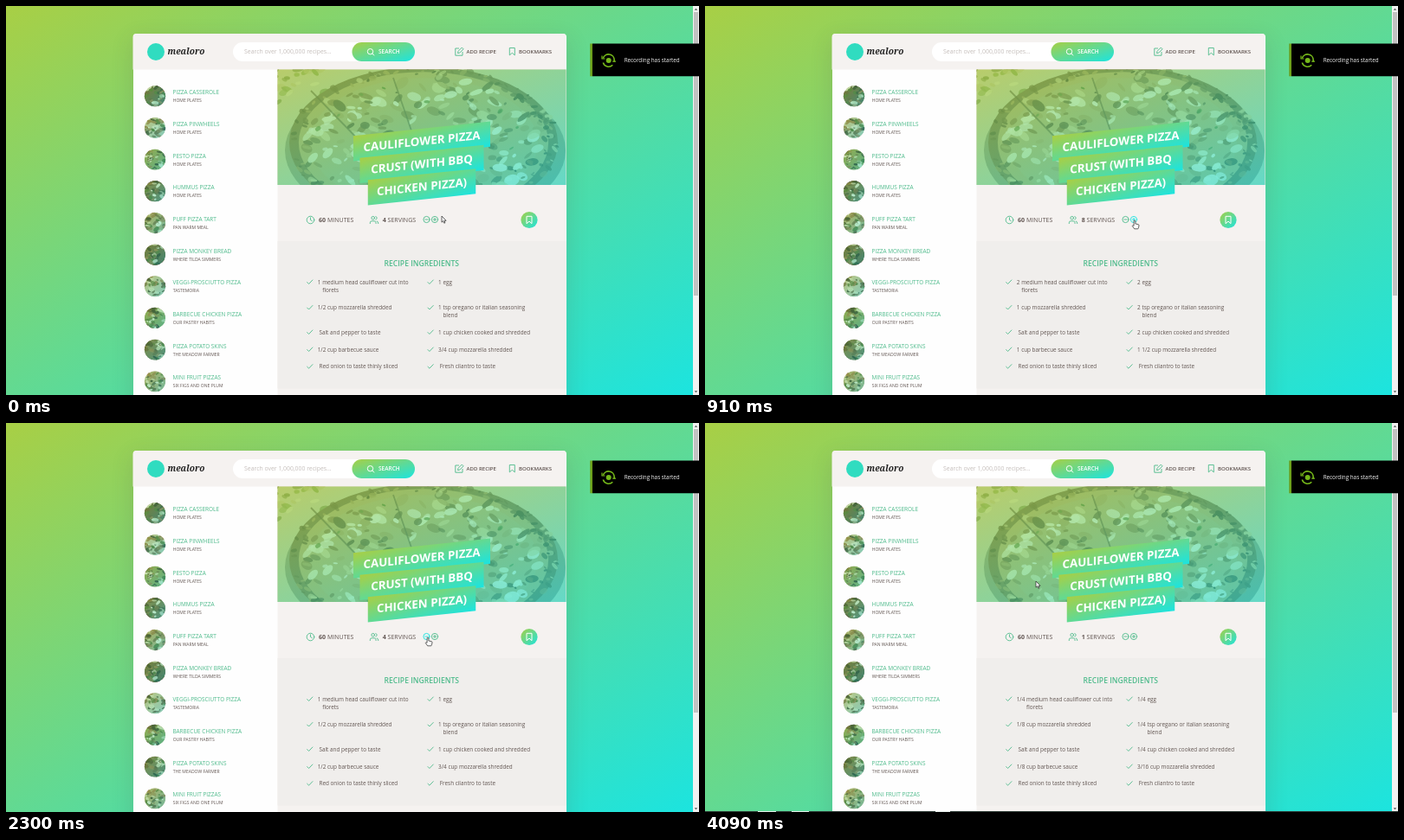
These frames come from a looping animation (800x450 px, 4.12 s). An HTML page:

```html
<!DOCTYPE html>
<html lang="en">
<head>
<meta charset="utf-8">
<title>Recipe servings</title>
<style>
  html, body { margin: 0; width: 100%; height: 100%; overflow: hidden; }
  body { position: relative; font-family: "Open Sans", "Noto Sans", sans-serif; color: #615551; }
  body > * { position: absolute; }
  #back { left: 0; top: 0; width: 793px; height: 455px; background: linear-gradient(to right bottom, #a8cf45, #1be4e0); }
  #card {
    left: 146.5px; top: 32px; width: 500px; height: 487px; border-radius: 4px; background: #fefefe;
    box-shadow: 0 8px 25px 2px rgba(78, 68, 61, .15);
  }
  svg { left: 0; top: 0; }
  .row { position: absolute; display: flex; white-space: nowrap; font-size: 6.37px; line-height: 9px; }
  .row b { font-weight: 400; margin-right: 1.8px; }
</style>
</head>
<body>
<div id="back"></div>
<div id="card"></div>
<svg width="800" height="450" viewBox="0 0 800 450" fill="#615551">
  <defs>
    <linearGradient id="mix" x1="0" y1="0" x2="1" y2="1">
      <stop stop-color="#a8cf45"/><stop offset="1" stop-color="#1be4e0"/>
    </linearGradient>
    <clipPath id="photoClip"><path d="M313.500 73.500H646.500V207H313.500Z"/></clipPath>
    <clipPath id="thumbClip"><circle r="12.200"/></clipPath>
    <path id="mark" d="M-3 -4.200h6v8.400l-3 -2.600l-3 2.600z" fill="none" stroke-linejoin="round"/>
    <g id="lens" fill="none" stroke="#fff"><circle r="3.200"/><path d="M2.300 2.300L4.600 4.600"/></g>
  </defs>

  <path d="M146.500 73.500V36a4 4 0 0 1 4 -4H642.500a4 4 0 0 1 4 4V450H313.500V73.500Z" fill="#f5f2f0"/>
  <path d="M313.500 272H646.500V442.500H313.500Z" fill="#f0eeec"/>

  <!-- header -->
  <circle cx="173" cy="53" r="10" fill="#30dcc0"/>
  <text x="186.500" y="56" font-size="10" font-weight="700" font-style="italic" font-family="'Noto Serif', serif" fill="#222">mealoro</text>
  <rect x="262" y="42" width="210" height="22" rx="11" fill="#fff"/>
  <text x="275" y="55.300" font-size="6.900" fill="#c5bebb">Search over 1,000,000 recipes...</text>
  <rect x="399.500" y="42" width="72.500" height="22" rx="11" fill="url(#mix)"/>
  <use href="#lens" x="420.500" y="52.700"/>
  <g font-weight="600">
    <text x="430" y="55.300" font-size="6.500" fill="#fff">SEARCH</text>
    <text x="531.500" y="55" font-size="6.050">ADD RECIPE</text>
    <text x="592" y="55" font-size="6.050">BOOKMARKS</text>
  </g>
  <g fill="none" stroke="#4fbb8c" stroke-width=".9" stroke-linejoin="round">
    <path d="M523 49H518.800V57.200H527V53M521.500 54.600L522 52.300L526.300 48L528.100 49.800L523.800 54.100Z"/>
    <use href="#mark" x="584.300" y="52.700"/>
  </g>

  <g id="list"></g>
  <g id="photo" clip-path="url(#photoClip)"></g>
  <g id="title" transform="translate(0 50.450) skewY(-6)" text-anchor="middle" font-size="13.350" font-weight="700"></g>

  <!-- details -->
  <g fill="none" stroke="#4fbb8c" stroke-width=".9" stroke-linecap="round">
    <circle cx="351.500" cy="247.500" r="4.300"/>
    <path d="M351.500 244.800V247.500L353.300 248.600"/>
    <circle cx="423.700" cy="245.200" r="1.800"/>
    <path d="M420.300 251.600V250.800a2 2 0 0 1 2 -2h2.800a2 2 0 0 1 2 2V251.600M426.800 243.500a1.800 1.800 0 0 1 0 3.500M428.200 249a2 2 0 0 1 1.500 1.900V251.600"/>
    <g id="minus"><circle cx="485.500" cy="247" r="3.600"/><path d="M483.900 247h3.200"/></g>
    <g id="plus"><circle cx="495" cy="247" r="3.600"/><path d="M493.400 247h3.200M495 245.400v3.200"/></g>
  </g>
  <g font-size="7.050">
    <text x="361" y="249.800"><tspan font-weight="700">60</tspan> MINUTES</text>
    <text x="434.700" y="249.800"><tspan id="count" font-weight="700">4</tspan> SERVINGS</text>
  </g>
  <circle cx="604" cy="247.500" r="9.600" fill="url(#mix)"/>
  <use href="#mark" x="604" y="247.500" stroke="#fff"/>

  <text x="479.800" y="300.800" font-size="8.600" font-weight="600" fill="#4fbb8c" text-anchor="middle">RECIPE INGREDIENTS</text>
  <g id="checks" fill="none" stroke="#4fbb8c" stroke-width=".9"></g>

  <!-- scrollbar -->
  <path d="M793 0H800V450H793Z" fill="#f1f1f1"/>
  <path d="M794 7H799V335H794Z" fill="#c1c1c1"/>
  <path d="M794.700 4.800L796.500 2.800L798.300 4.800ZM794.700 445.200L796.500 447.200L798.300 445.200Z" fill="#555"/>

  <!-- recorder notice -->
  <path d="M677 43.500H800V81.300H677Z" fill="#000"/>
  <path d="M674.300 43.500H677V81.300H674.300Z" fill="#6c9f1b"/>
  <g fill="none" stroke="#76b91a" stroke-width="1.600">
    <path d="M689.300 60.500A6.600 6.600 0 0 1 702.200 62.500V64.500M700.300 68.300A6.600 6.600 0 0 1 689.300 65.500"/>
    <path d="M688 57.500V61H691.500M704 64.200H700.200" stroke-width="1.200"/>
    <circle cx="695.700" cy="63" r="3" fill="#76b91a" stroke="none"/>
  </g>
  <text x="713.700" y="65.300" font-size="6.300" fill="#f4f4f4">Recording has started</text>

  <g id="bar">
    <path d="M0 449H800V450H0Z" fill="#2c3a34"/>
    <path d="M61 449.500H82M100 449.500H120M266 449.500H283" stroke="#e4ece8"/>
  </g>
  <g id="pointer" stroke="#222" stroke-width=".7" stroke-linejoin="round" fill="#fff">
    <path id="arrow" d="M0 0V7.200L1.700 5.700L2.800 8.200L4 7.700L2.900 5.300H5.100Z"/>
    <path id="hand" d="M-.9 1a.9 .9 0 0 1 1.800 0V4l3.200 .6q1 .3 .9 1.400l-.5 2.300q-.2 .9 -.7 1.500H-.3L-2.700 6.500q.2 -1.400 1.800 -.3z"/>
  </g>
</svg>
<div id="rows"></div>

<script>
const $ = id => document.getElementById(id);
const LOOP = 4120;

let seed = 7;
const rnd = (lo = 0, hi = 1) => {
  seed = (seed * 16807) % 2147483647;
  return lo + (hi - lo) * seed / 2147483647;
};
const pick = list => list[Math.floor(rnd(0, list.length))];
const blob = (x, y, r, colors) =>
  `<ellipse cx="${x}" cy="${y}" rx="${r}" ry="${r * rnd(.3, .75)}" fill="${pick(colors)}"
    transform="rotate(${rnd(-50, 50)} ${x} ${y})" opacity="${rnd(.6, 1)}"/>`;

// Scatter blobs in an elliptical ring between two relative radii.
function scatter(n, [cx, cy, rx, ry], [from, to], [small, large], colors) {
  let out = '';
  for (let i = 0; i < n; i++) {
    const a = rnd(0, Math.PI * 2);
    const d = Math.sqrt(rnd(from * from, to * to));
    out += blob(cx + Math.cos(a) * rx * d, cy + Math.sin(a) * ry * d, rnd(small, large), colors);
  }
  return out;
}

const recipes = [
  ['PIZZA CASSEROLE', 'HOME PLATES'], ['PIZZA PINWHEELS', 'HOME PLATES'],
  ['PESTO PIZZA', 'HOME PLATES'], ['HUMMUS PIZZA', 'HOME PLATES'],
  ['PUFF PIZZA TART', 'PAN WARM MEAL'], ['PIZZA MONKEY BREAD', 'WHERE TILDA SIMMERS'],
  ['VEGGI-PROSCIUTTO PIZZA', 'TASTEMORIA'], ['BARBECUE CHICKEN PIZZA', 'OUR PASTRY HABITS'],
  ['PIZZA POTATO SKINS', 'THE MEADOW FARMER'], ['MINI FRUIT PIZZAS', 'SIX FIGS AND ONE PLUM']
];
const bases = ['#5b4a30', '#c9bca4', '#87914f', '#6b6044', '#b09c70'];
const foods = ['#1f1a12', '#5a3a20', '#e6dcc0', '#fffaf0', '#44581f', '#96653c'];
$('list').innerHTML = recipes.map(([name, by], i) => {
  const y = 104.3 + i * 36.67;
  return `<g transform="translate(172 ${y})" clip-path="url(#thumbClip)">
      <circle r="12.2" fill="${bases[i % 5]}"/>
      ${scatter(34, [0, 0, 12, 12], [0, 1], [1.2, 4], foods)}
      <circle r="12.2" fill="url(#mix)" opacity=".4"/>
    </g>
    <text x="192.500" y="${y - 2}" font-size="6.450" fill="#4fbb8c">${name}</text>
    <text x="192.700" y="${y + 7}" font-size="5.050">${by}</text>`;
}).join('');

const pizza = [482, 158, 155, 88];
const disc = (k, fill) =>
  `<ellipse cx="482" cy="158" rx="${155 * k}" ry="${88 * k}" fill="${fill}"/>`;
$('photo').innerHTML =
  '<path d="M313 73H647V207H313Z" fill="#d2c8a2"/>' +
  scatter(30, [335, 90, 40, 28], [0, 1], [3, 9], ['#8c9a44', '#e6dcb0', '#6f7a35', '#c9bb82']) +
  '<ellipse cx="484" cy="167" rx="162" ry="88" fill="#8d8568"/>' +
  disc(1, '#6d5430') + disc(.93, '#b99a60') + disc(.85, '#b7a06a') +
  scatter(150, pizza, [.9, 1], [1.5, 5], ['#33240f', '#5a4020', '#a5834a', '#d6bf88']) +
  scatter(260, pizza, [0, .88], [2.5, 9], ['#fbf3d8', '#fffaf0', '#e0cd98', '#7d5a2c', '#4d3a1e', '#a98a52']) +
  scatter(40, pizza, [.1, .85], [1.5, 4], ['#47661c', '#33240f']) +
  '<path d="M352 98L412 160M447 83L470 150" stroke="#4a3820" stroke-width="1.800" opacity=".7"/>' +
  '<path d="M313 73H647V207H313Z" fill="url(#mix)" opacity=".6"/>';

$('title').innerHTML = [['CAULIFLOWER PIZZA', 158], ['CRUST (WITH BBQ', 143], ['CHICKEN PIZZA)', 124.500]]
  .map(([text, w], i) => {
    const y = 156.500 + i * 26.400;
    return `<rect x="${480 - w / 2}" y="${y - 14.600}" width="${w}" height="29.200" fill="url(#mix)"/>
      <text x="480" y="${y + 4.600}" fill="#fff">${text}</text>`;
  }).join('');

// Amounts are for four servings; 0 means no amount.
const items = [
  [1, 'medium head cauliflower cut into<br>florets'], [1, 'egg'],
  [.5, 'cup mozzarella shredded'], [1, 'tsp oregano or italian seasoning<br>blend'],
  [0, 'Salt and pepper to taste'], [1, 'cup chicken cooked and shredded'],
  [.5, 'cup barbecue sauce'], [.75, 'cup mozzarella shredded'],
  [0, 'Red onion to taste thinly sliced'], [0, 'Fresh cilantro to taste']
];
const rowY = [319, 348.5, 377, 397, 416.7];
const place = i => [i % 2 ? 499 : 359.700, rowY[i >> 1]];
$('rows').style.cssText = 'left:0;top:0';
$('rows').innerHTML = items.map(([, text], i) => {
  const [x, y] = place(i);
  return `<div class="row" style="left:${x}px;top:${y - 4.500}px"><b></b><span>${text}</span></div>`;
}).join('');
$('checks').innerHTML = items.map((_, i) => {
  const [x, y] = place(i);
  return `<path d="M${x - 12.300} ${y + .3}l2.200 2.200l4.600 -4.800"/>`;
}).join('');
const amounts = [...document.querySelectorAll('.row b')];

function fraction(n) {
  const whole = Math.floor(n);
  let top = (n - whole) * 16, low = 16;
  while (top && top % 2 === 0) { top /= 2; low /= 2; }
  return [whole || '', top ? `${top}/${low}` : ''].join(' ').trim();
}

let shown = 0;
function setServings(n) {
  if (n === shown) return;
  shown = n;
  $('count').textContent = n;
  items.forEach(([q], i) => { amounts[i].textContent = q ? fraction(q * n / 4) : ''; });
}

const servings = [[0, 4], [800, 8], [1950, 4], [2650, 2], [3350, 1]];
const path = [
  [0, 503, 243], [200, 502.500, 243.500], [450, 496, 248], [950, 496, 248], [1180, 488.500, 248],
  [1600, 487, 248], [3550, 487, 248], [4060, 382, 183], [LOOP, 382, 183]
];

function pointerAt(t) {
  const i = path.findIndex(p => p[0] > t);
  const [t0, x0, y0] = path[i - 1], [t1, x1, y1] = path[i];
  const u = (t - t0) / (t1 - t0), k = u * u * (3 - 2 * u);
  return [x0 + (x1 - x0) * k, y0 + (y1 - y0) * k];
}

function draw(t) {
  const [x, y] = pointerAt(t);
  const onMinus = Math.hypot(x - 485.500, y - 247) < 4.900;
  const onPlus = !onMinus && Math.hypot(x - 495, y - 247) < 4.900;
  const tint = on => on ? '#1be4e0' : '#4fbb8c';
  const hand = onMinus || onPlus;
  $('minus').setAttribute('stroke', tint(onMinus));
  $('plus').setAttribute('stroke', tint(onPlus));
  $('pointer').setAttribute('transform', `translate(${x} ${y})`);
  $('hand').style.display = hand ? '' : 'none';
  $('arrow').style.display = hand ? 'none' : '';
  $('bar').style.display = t >= 4060 ? '' : 'none';
  setServings(servings.filter(s => s[0] <= t).pop()[1]);
}

const start = performance.now();
function tick() {
  draw((performance.now() - start) % LOOP);
  requestAnimationFrame(tick);
}
tick();
</script>
</body>
</html>
```
